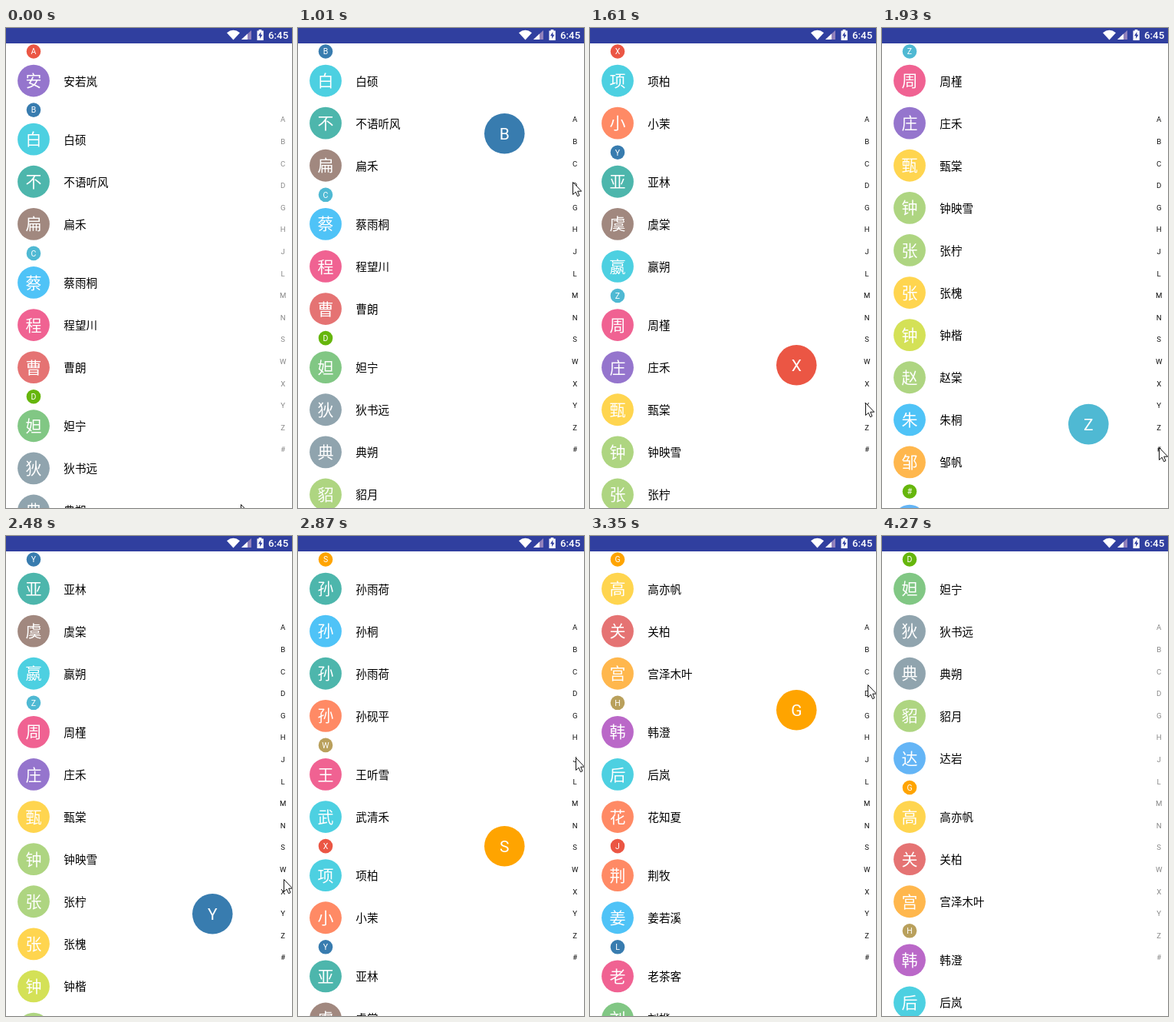
Recreate the animation shown at these times as an HTML page. Size 373 px wide and 624 px high, loop 5.05 s.

```html
<!DOCTYPE html>
<html lang="zh-CN">
<head>
<meta charset="utf-8">
<title>Contact index</title>
<style>
  html, body { margin: 0; width: 100%; height: 100%; overflow: hidden; background: #fff; }
  svg { display: block; width: 100%; height: 100%; }
  text { font-family: Roboto, sans-serif; }
  .cjk { font-family: "Noto Sans CJK SC", "Noto Sans CJK", "Noto Sans", sans-serif; }
  .mid { text-anchor: middle; fill: #fff; }
  #index text { text-anchor: middle; font-size: 9.6px; fill: #888; }
  #index.pressed text { fill: #111; }
</style>
</head>
<body>
<svg viewBox="0 0 373 624">
  <g id="list"></g>
  <g id="sticky"><rect y="20" width="240" height="21" fill="#fff"/></g>
  <g id="index"></g>
  <g id="bubble">
    <circle r="26.3"/>
    <text class="mid" y="7.5" font-size="21">A</text>
  </g>
  <g fill="#fff">
    <rect width="373" height="20" fill="#303f9f"/>
    <path d="M288 6.2Q296.5 -.6 305 6.2L296.5 15.5Z"/>
    <path d="M320 3V15H307Z" fill="#9181bb"/>
    <path d="M315 7.6V15H307Z"/>
    <path d="M327.5 3.5H329.7V2H333.3V3.5H335.8V16H327.5Z"/>
    <path d="M332.4 5L329 10.2H331.2V14L334.5 8.8H332.4Z" fill="#303f9f"/>
    <text x="342" y="14.3" font-size="13.3" font-weight="500">6:45</text>
  </g>
  <path id="cursor" d="M.5 .5V16.5L4.2 13.2L6.6 18.7L9 17.6L6.7 12.2H11.7Z" fill="#fff" stroke="#111"/>
</svg>
<script>
const LOOP = 5050, TOP = 20, HEAD = 21, ROW = 55.1, VIEW = 604;
const INDEX_Y = 119, INDEX_STEP = 28.6;
const PRESS = 850, RELEASE = 3600;
const dotColors = ['#eb5644', '#387caf', '#4fb9d3', '#66b60c', '#ffa400', '#b9a05c'];
const avatarColors = ['#e57373', '#f06292', '#ba68c8', '#9575cd', '#64b5f6', '#4fc3f7',
  '#4dd0e1', '#4db6ac', '#81c784', '#aed581', '#ff8a65', '#d4e157', '#ffd54f',
  '#ffb74d', '#a1887f', '#90a4ae'];

// Each entry ends with a hex digit that picks the avatar colour.
const sections = Object.entries({
  A: '安若岚3',
  B: '白硕6 不语听风7 扁禾e',
  C: '蔡雨桐5 程望川1 曹朗0',
  D: '妲宁8 狄书远f 典朔f 貂月9 达岩4',
  G: '高亦帆c 关柏0 宫泽木叶d',
  H: '韩澄2 后岚6 花知夏a',
  J: '荆牧a 姜若溪5',
  L: '老茶客1 刘桦8 李槿4 林砚秋d 吕汀3 陆遥川7',
  M: '莫清e 孟禾5',
  N: '宁朔2',
  S: '孙雨荷7 孙桐5 孙雨荷7 孙砚平a',
  W: '王听雪1 武清禾6',
  X: '项柏6 小茉a',
  Y: '亚林7 虞棠e 嬴朔6',
  Z: '周槿1 庄禾3 甄棠c 钟映雪9 张柠9 张槐c 钟楷b 赵棠9 朱桐5 邹帆d',
  '#': '10244'
}).map(([letter, names], i) => ({ letter, color: dotColors[i % 6], names: names.split(' ') }));

const $ = id => document.getElementById(id);

function add(parent, tag, attrs, text) {
  const node = document.createElementNS('http://www.w3.org/2000/svg', tag);
  for (const key in attrs) node.setAttribute(key, attrs[key]);
  if (text) node.textContent = text;
  return parent.appendChild(node);
}

function addDot(parent, y, { letter, color }) {
  const dot = add(parent, 'circle', { cx: 36, cy: y, r: 9.3, fill: color });
  const label = add(parent, 'text', { class: 'mid', x: 36, y: y + 3.8, 'font-size': 10.5 }, letter);
  return { dot, label };
}

function addRow(y, entry) {
  const name = entry.slice(0, -1), color = avatarColors[parseInt(entry.slice(-1), 16)];
  add($('list'), 'circle', { cx: 36, cy: y, r: 20.9, fill: color });
  add($('list'), 'text', { class: 'cjk mid', x: 36, y: y + 7.6, 'font-size': 21 }, name[0]);
  add($('list'), 'text', { class: 'cjk', x: 75.3, y: y + 6, 'font-size': 14.6 }, name);
}

let total = 0;
sections.forEach((section, i) => {
  section.top = total;
  addDot($('list'), TOP + total + HEAD / 2, section);
  total += HEAD;
  for (const entry of section.names) {
    addRow(TOP + total + ROW / 2, entry);
    total += ROW;
  }
  add($('index'), 'text', { x: 361.2, y: INDEX_Y + i * INDEX_STEP + 3.4 }, section.letter);
});
const sticky = addDot($('sticky'), TOP + HEAD / 2, sections[0]);
const [bubbleDisc, bubbleText] = $('bubble').children;

// Four moves, each redrawn in even steps; the picture rests in between.
const moves = [
  { from: 70, to: 600, steps: 7 },
  { from: 850, to: 2020, steps: 15 },
  { from: 2330, to: 3350, steps: 13 },
  { from: 3470, to: 4270, steps: 11 }
];

function snap(time) {
  const move = moves.filter(m => m.from <= time).pop();
  if (!move) return 0;
  const step = (move.to - move.from) / move.steps;
  const n = Math.floor((time - move.from) / step + 0.28);
  return move.from + Math.min(n, move.steps) * step;
}

// Key points: time, then coordinates. The touch trails the pointer.
const cursorPath = [[0, 306, 619], [530, 358, 133], [770, 358, 129], [1006, 358, 200],
  [1630, 359, 487], [1860, 361, 545], [2250, 361, 545], [2487, 362, 446],
  [2879, 362, 288], [3350, 362, 193], [3500, 362, 193], [4270, 357, 640]];
const touchPath = [[850, 126], [1006, 148], [1630, 449], [2020, 545], [2330, 545],
  [2487, 502], [2879, 414], [3350, 237], [3470, 204]];

function along(path, t) {
  const next = path.findIndex(key => key[0] > t);
  if (next < 1) return path.at(next).slice(1);
  const a = path[next - 1], b = path[next], u = (t - a[0]) / (b[0] - a[0]);
  return a.slice(1).map((v, i) => v + (b[i + 1] - v) * u);
}

function place(id, x, y) {
  $(id).setAttribute('transform', `translate(${x} ${y})`);
}

function draw(time) {
  const t = snap(time);
  const [x, y] = along(cursorPath, t).map(Math.round);
  const [touch] = along(touchPath, t);
  const pressed = t >= PRESS && t < RELEASE;
  const target = sections[t < PRESS ? 0 : Math.round((touch - INDEX_Y) / INDEX_STEP)];
  const scroll = Math.min(target.top, total - VIEW);
  const current = sections.filter(s => s.top <= scroll).pop();

  place('list', 0, -scroll);
  sticky.dot.setAttribute('fill', current.color);
  sticky.label.textContent = current.letter;
  $('index').classList.toggle('pressed', pressed);
  $('bubble').style.display = pressed ? '' : 'none';
  place('bubble', 269.3, touch - 10.7);
  bubbleDisc.setAttribute('fill', target.color);
  bubbleText.textContent = target.letter;
  place('cursor', x, y);
}

function loop() {
  draw(performance.now() % LOOP);
  requestAnimationFrame(loop);
}
loop();
</script>
</body>
</html>
```
